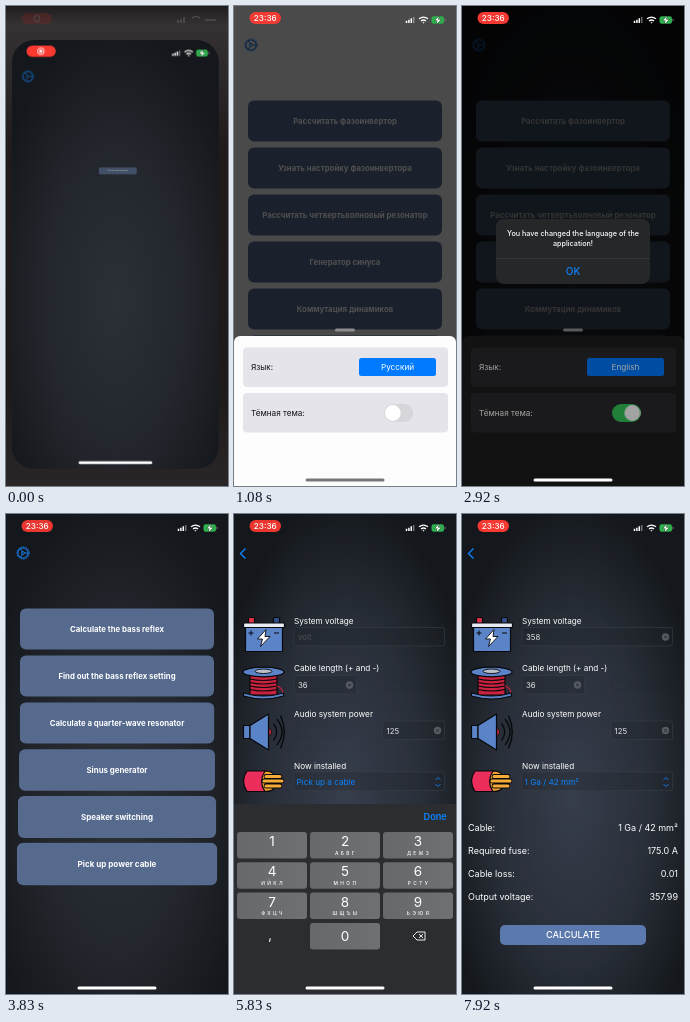
Recreate the animation shown at these times as an HTML page. Size 222 by 480 pixels, loop 8000 ms.

```html
<!DOCTYPE html>
<html lang="en">
<head>
<meta charset="utf-8">
<title>Speaker calculator</title>
<style>
  html, body { margin: 0; width: 100%; height: 100%; overflow: hidden; background: #0b0a0a; }
  svg { position: absolute; left: 0; top: 0; width: 222px; height: 480px; display: block; }
  #app { transform-origin: 0 0; }
  text { font-family: Inter, "Noto Sans", sans-serif; font-size: 8.2px; fill: #fff; white-space: pre; }
  .mid { text-anchor: middle; }
  .end { text-anchor: end; }
  .bold { font-weight: 600; }
  .blue { fill: #0a84ff; }
  .button, .pop { transform-box: fill-box; transform-origin: center; }
  .button rect { fill: #566a8e; }
  .button text { font-size: 7.8px; font-weight: 700; text-anchor: middle; }
  .box { fill: #1c2027; fill-opacity: .25; stroke: #3a3f48; stroke-width: .6; }
  .hint { fill: #4b4f58; font-size: 7.8px; }
  .value { fill: #e2e3e6; font-size: 7.8px; }
  .result text { font-size: 9px; }
  .key rect { fill: url(#keycap); }
  .key .digit { font-size: 13.5px; }
  .key .letters { font-size: 4.8px; font-weight: 500; letter-spacing: .5em; }
  .art { stroke: #08090c; stroke-width: 1.2; stroke-linejoin: round; }
</style>
</head>
<body>
<svg id="home" viewBox="0 0 222 480">
  <defs>
    <linearGradient id="wall" x2="0" y2="1">
      <stop offset="0" stop-color="#1f1d1e"/><stop offset=".04" stop-color="#353234"/>
      <stop offset=".3" stop-color="#211a1b"/><stop offset=".8" stop-color="#1f1a1a"/>
      <stop offset="1" stop-color="#2a2627"/>
    </linearGradient>
  </defs>
  <rect width="222" height="480" fill="url(#wall)"/>
  <g opacity=".3">
    <rect x="16" y="7" width="30" height="11" rx="5.5" fill="#8a2420"/>
    <circle cx="31" cy="12.5" r="3" fill="none" stroke="#999"/>
    <path d="M172 17v-3m3 3v-4m3 4v-6M186 12q4-3 8 0M199 14h11" stroke="#999" stroke-width="1.6" fill="none"/>
  </g>
</svg>

<svg id="app" viewBox="0 0 222 480">
  <defs>
    <radialGradient id="night" cx=".5" cy=".58" r=".62">
      <stop offset="0" stop-color="#2b2f36"/><stop offset=".55" stop-color="#23272d"/>
      <stop offset="1" stop-color="#14171b"/>
    </radialGradient>
    <radialGradient id="glow" cx=".5" cy=".58" r=".62">
      <stop offset="0" stop-color="#7086b8" stop-opacity=".17"/>
      <stop offset=".55" stop-color="#7086b8" stop-opacity=".09"/>
      <stop offset="1" stop-color="#7086b8" stop-opacity="0"/>
    </radialGradient>
    <linearGradient id="keycap">
      <stop offset="0" stop-color="#67686b"/><stop offset="1" stop-color="#6f7073"/>
    </linearGradient>
  </defs>
  <rect width="222" height="480" fill="url(#night)"/>
  <rect id="day" width="222" height="480" fill="#f0eff2"/>

  <g id="menu">
    <g id="gear" fill="none" stroke="#1878e0" transform="translate(17 39)">
      <circle r="5.2" stroke-width="1.2"/>
      <circle r="6.2" stroke-width="1" stroke-dasharray="1.3 1.3"/>
      <circle r="1.4"/>
      <path d="M1.4 0H5M-.7-1.2-2.5-4.3M-.7 1.2-2.5 4.3"/>
    </g>
    <g id="ru"></g>
    <g id="en"></g>
  </g>

  <g id="page">
    <rect width="222" height="480" fill="url(#glow)"/>
    <path d="M11.500 34.500 6.500 39.500 11.500 44.500" fill="none" stroke="#0a84ff" stroke-width="1.4"/>
    <g class="art">
      <rect x="14.500" y="103.500" width="6" height="6" rx="1" fill="#e0304a"/>
      <rect x="39.500" y="103.500" width="6" height="6" rx="1" fill="#32508c"/>
      <rect x="11.500" y="113" width="37" height="24.500" fill="#5a83c8"/>
      <rect x="9.500" y="109" width="41" height="4.500" rx="1" fill="#e6ebf4"/>
      <path d="M14.500 119h5m-2.500-2.500v5M40 119h5" fill="none" stroke-width="1"/>
      <path d="M32 115.500 23.500 125h5l-2 7.500 9.500-10h-5z" fill="#fff" stroke-width=".9"/>
    </g>
    <g class="art">
      <path d="M16 160h27v21H16z" fill="#c9223e"/>
      <path d="M16 165q13 3 27 0M16 168.500q13 3 27 0M16 172q13 3 27 0M16 175.500q13 3 27 0" fill="none" stroke-width="1.100"/>
      <path d="M43 172q6 2 6 8" fill="none" stroke="#c9223e"/>
      <path d="M9.500 179q20 6 40 0v3q-20 6-40 0z" fill="#5a83c8"/>
      <ellipse cx="29.500" cy="158" rx="20.500" ry="4.800" fill="#5a83c8"/>
      <ellipse cx="29.500" cy="157.300" rx="8.500" ry="2.200" fill="#b9c0cc" stroke-width=".9"/>
    </g>
    <g class="art">
      <rect x="9.500" y="211.500" width="6.500" height="13" fill="#5a83c8"/>
      <path d="M16 211.500 34.500 200v36L16 224.500z" fill="#5a83c8"/>
      <path d="M35 213.500q5 4.500 0 9z" fill="#e0304a" stroke-width=".8"/>
      <path d="M39.500 209.500q6.500 8.500 0 17M43 205q10 13 0 26M46.500 201.500q7.500 16.500 0 33" fill="none" stroke-width="1.400"/>
    </g>
    <g class="art">
      <path d="M13 257h19q-6 10 0 20.500H13q-7-10.500 0-20.500z" fill="#ec2e5c"/>
      <path d="M31 257q-7 10.500 0 20.500 8 0 9-4V261q-2-4-9-4z" fill="#f0a030"/>
      <path d="M32 262.500h14M30 267h18M32 272h14" fill="none" stroke-width="4.800" stroke-linecap="round"/>
      <path d="M32 262.500h14M30 267h18M32 272h14" fill="none" stroke="#f4ab38" stroke-width="3" stroke-linecap="round"/>
    </g>
    <g id="form"></g>
    <g id="results" class="result"></g>
    <g id="calc">
      <rect x="38" y="411" width="146" height="20" rx="5" fill="#5b79ad"/>
      <text class="mid" x="111" y="424.300" style="font-size:9.200px;font-weight:500">CALCULATE</text>
    </g>
    <g id="picker" class="pop"></g>
  </g>

  <g id="keyboard">
    <rect y="290" width="222" height="190" fill="#2c2d30"/>
    <text class="blue bold" x="189.500" y="305.500" style="font-size:9.200px">Done</text>
    <g id="keys"></g>
    <text class="mid" x="36" y="426" style="font-size:13px">,</text>
    <path d="M179 422l4-4h8v8h-8zM185 420l4 4m0-4-4 4" fill="none" stroke="#fff" stroke-width=".9"/>
  </g>

  <rect id="dim" width="222" height="480" opacity="0"/>
  <g id="sheet">
    <rect x="101" y="322.500" width="20" height="3" rx="1.500" fill="#8d8d91"/>
    <rect id="sheetBg" y="330" width="222" height="170" rx="6"/>
    <rect class="row" x="9" y="341.500" width="205" height="39.500" rx="4"/>
    <rect class="row" x="9" y="387" width="205" height="39.500" rx="4"/>
    <text class="label" x="17" y="364">Язык:</text>
    <text class="label" x="17" y="410">Тёмная тема:</text>
    <rect x="125" y="352" width="77" height="18" rx="2.500" fill="#007aff"/>
    <text id="langRu" class="mid" x="163.500" y="364">Русский</text>
    <text id="langEn" class="mid" x="163.500" y="364">English</text>
    <rect id="track" x="150" y="398" width="29" height="18" rx="9"/>
    <circle id="knob" cx="158.800" cy="407" r="7.900" fill="#fff"/>
    <g id="langMenu" class="pop">
      <rect x="110" y="304" width="96" height="44" rx="6" fill="#2b2c2f"/>
      <path d="M110 326h96" stroke="#46474b" stroke-width=".6"/>
      <text x="126" y="318">Русский</text>
      <text x="126" y="340">English</text>
      <path d="M116 315l2 2.500 4-5" fill="none" stroke="#fff"/>
    </g>
  </g>

  <rect id="alertDim" width="222" height="480" opacity="0"/>
  <g id="alert" class="pop">
    <rect x="34" y="213" width="154" height="65" rx="8" fill="#262729"/>
    <g class="mid" style="font-weight:500">
      <text x="111" y="230" style="font-size:7.200px">You have changed the language of the</text>
      <text x="111" y="239.500" style="font-size:7.200px">application!</text>
      <text class="blue" x="111" y="269" style="font-size:10px">OK</text>
    </g>
    <path d="M34 252.500h154" stroke="#404145" stroke-width=".6"/>
  </g>

  <rect id="pill" x="15.500" y="6" width="31.500" height="12" rx="6" fill="#fb3a32"/>
  <g id="rec" fill="none" stroke="#fff"><circle cx="31" cy="12" r="3.500"/><circle cx="31" cy="12" r="1.300" fill="#fff"/></g>
  <text id="clock" class="mid" x="31.200" y="15" style="font-weight:500">23:36</text>
  <g fill="none" stroke="#fff" stroke-width="1.500">
    <path d="M172.500 17v-2.200m2.400 2.200v-3.200m2.400 3.200v-4.700"/>
    <path d="M179.700 17v-6" opacity=".4"/>
    <path d="M185 12.800q4.500-3.500 9 0M187 15q2.500-2 5 0" stroke-width="1.300"/>
    <circle cx="189.500" cy="16.700" r=".4" stroke-width="1"/>
  </g>
  <rect x="197.500" y="10.300" width="12.500" height="7.400" rx="2.200" fill="#2fae4e"/>
  <path d="M211 12.800v2.400" stroke="#777" stroke-width="1"/>
  <path d="M205 10l-4 4.500h2.500l-1 3.500 4.500-4.500H204z" fill="#fff" stroke="#0d2213" stroke-width=".7" paint-order="stroke"/>
  <rect id="homeBar" x="71.500" y="472.600" width="79" height="3" rx="1.500"/>
</svg>

<script>
const LOOP = 8000;
const find = id => document.getElementById(id);
const all = target => typeof target === 'string' ? [...document.querySelectorAll(target)] : [target];

// frames: [[ms, properties], ...]; the first and last poses are held to the loop's ends
function anim(target, frames) {
  const poses = [[0, frames[0][1]], ...frames, [LOOP, frames.at(-1)[1]]]
    .map(([ms, props]) => ({ ...props, offset: ms / LOOP }));
  all(target).forEach(el => el.animate(poses, { duration: LOOP, iterations: Infinity }));
}

function fade(target, ...stops) {
  anim(target, stops.map(([ms, opacity]) => [ms, { opacity }]));
}

function show(target, from, to = LOOP, time = 0) {
  const stops = from > 0 ? [[from, 0], [from + time, 1]] : [[0, 1]];
  if (to < LOOP) stops.push([to, 1], [to + time, 0]);
  fade(target, ...stops);
}

function pop(id, from, to) {
  const small = { opacity: 0, transform: 'scale(.85)' }, full = { opacity: 1, transform: 'scale(1)' };
  anim('#' + id, [[from, small], [from + 110, full], [to, full], [to + 90, small]]);
}

function slide(id, from, to, ...times) {
  const start = { transform: from, easing: 'ease-out' }, end = { transform: to, easing: 'ease-in' };
  anim('#' + id, times.map((ms, i) => [ms, i === 1 || i === 2 ? end : start]));
}

function add(parent, markup) {
  find(parent).insertAdjacentHTML('beforeend', markup);
  return find(parent).lastElementChild;
}

// App window opening
const opening = 'cubic-bezier(.2,.7,.3,1)';
const windowed = { transform: 'translate(6px,34px) scale(.932)', clipPath: 'inset(0px 0px 20px 0px round 24px)' };
anim('#app', [[0, windowed], [60, { ...windowed, easing: opening }],
  [320, { transform: 'translate(0px,0px) scale(1)', clipPath: 'inset(0px 0px 0px 0px round 0px)' }]]);
anim('#homeBar', [[60, { transform: 'translateY(-20.5px)', easing: opening }], [320, { transform: 'translateY(0px)' }]]);
fade('#gear', [60, .6], [300, 1]);
show('#rec', 0, 580);
show('#clock', 580);
find('pill').animate({ opacity: [1, .9, 1] }, { duration: 1600, iterations: Infinity });

// Menus
function buildMenu(id, labels, start, gap) {
  labels.forEach((label, i) => {
    const top = 94.5 + 47 * i, t = start + gap * i;
    const button = add(id, `<g class="button"><rect x="14" y="${top}" width="194" height="41" rx="6"/>
      <text x="111" y="${top + 23.5}">${label}</text></g>`);
    const seed = { transform: 'translate(2.5px,25.5px) scale(.21,.19)', easing: 'ease-out' };
    anim(button, [
      [t, { ...seed, opacity: start < 100 && i === 0 ? .6 : 0 }],
      [t + 250, { transform: 'translate(0px,0px) scale(1.04,1.04)', opacity: 1, easing: 'ease-in-out' }],
      [t + 420, { transform: 'translate(0px,0px) scale(1,1)', opacity: 1 }]]);
  });
}
buildMenu('ru', ['Рассчитать фазоинвертор', 'Узнать настройку фазоинвертора',
  'Рассчитать четвертьволновый резонатор', 'Генератор синуса', 'Коммутация динамиков',
  'Подобрать силовой кабель'], 60, 60);
buildMenu('en', ['Calculate the bass reflex', 'Find out the bass reflex setting',
  'Calculate a quarter-wave resonator', 'Sinus generator', 'Speaker switching',
  'Pick up power cable'], 3380, 30);
show('#ru', 0, 3380);
show('#en', 3380);

// Settings sheet and theme
slide('sheet', 'translateY(165px)', 'translateY(0px)', 600, 850, 3130, 3350);
fade('#dim', [600, 0], [850, .69], [3130, .69], [3350, 0]);
function theme(target, prop, dark, light) {
  anim(target, [[950, dark], [1040, light], [1500, light], [1600, dark]].map(([ms, v]) => [ms, { [prop]: v }]));
}
theme('#day', 'opacity', 0, 1);
theme('#sheetBg', 'fill', '#1c1c1e', '#fdfdfe');
theme('.row', 'fill', '#29292b', '#e5e4ea');
theme('.label', 'fill', '#ffffff', '#111113');
theme('#track', 'fill', '#34c759', '#d6d5da');
theme('#knob', 'transform', 'translateX(11.5px)', 'translateX(0px)');
theme('#homeBar', 'fill', '#ffffff', '#77777b');
pop('langMenu', 1950, 2400);
show('#langRu', 0, 2440);
show('#langEn', 2440);
pop('alert', 2600, 3050);
fade('#alertDim', [2600, 0], [2710, .36], [3050, .36], [3140, 0]);

// Cable page
anim('#menu', [[4120, { transform: 'translateX(0px)', opacity: 1, easing: 'ease-out' }],
  [4400, { transform: 'translateX(-66px)', opacity: 0 }]]);
slide('page', 'translateX(222px)', 'translateX(0px)', 4120, 4400);
slide('keyboard', 'translateY(190px)', 'translateY(0px)', 4480, 4660, 6380, 6560);

const form = markup => add('form', markup);
const box = (x, y, w) => `<rect class="box" x="${x}" y="${y}" width="${w}" height="18.5" rx="2"/>`;
[['System voltage', 110], ['Cable length (+ and -)', 157], ['Audio system power', 202.5], ['Now installed', 255]]
  .forEach(([label, y]) => form(`<text x="60" y="${y}">${label}</text>`));

// An input that is typed in one key at a time, then left
function field(x, y, w, hint, word, times, blur) {
  form(box(x, y, w));
  const baseline = y + 12.8;
  show(form(`<text class="hint" x="${x + 4}" y="${baseline}">${hint}</text>`), 0, times[0]);
  const typed = (text, caret) => form(
    `<text class="value" x="${x + 4}" y="${baseline}">${text}<tspan class="blue">${caret}</tspan></text>`);
  times.forEach((t, i) => {
    show(typed(word.slice(0, i + 1), '|'), t, times[i + 1] ?? blur);
    flashKey(word[i], t);
  });
  show(typed(word, ''), blur);
  const [cx, cy] = [x + w - 7, y + 9.5];
  show(form(`<g><circle cx="${cx}" cy="${cy}" r="3.7" fill="#565a62"/>
    <path d="M${cx - 1.3} ${cy - 1.3}l2.6 2.6m0-2.6-2.6 2.6" stroke="#222" stroke-width=".8"/></g>`), times[0]);
}

// The alternative input fades once its partner is filled
function alternative(x, y, w, hint, t) {
  fade(form(`<g>${box(x, y, w)}<text class="hint" x="${x + 4}" y="${y + 12.8}">${hint}</text></g>`), [t, 1], [t + 100, .1]);
  show(form(`<text class="mid bold" x="135" y="${y + 12.3}">and</text>`), 0, t, 100);
}

// Keypad
const letters = ['', 'АБВГ', 'ДЕЖЗ', 'ИЙКЛ', 'МНОП', 'РСТУ', 'ФХЦЧ', 'ШЩЪЫ', 'ЬЭЮЯ'];
const keyAt = digit => digit === 0 ? [76, 409] : [3 + 73 * ((digit - 1) % 3), 318 + 30.2 * Math.floor((digit - 1) / 3)];
const keyRect = ([x, y], extra = '') => `<rect x="${x}" y="${y}" width="70" height="26.5" rx="3" ${extra}/>`;
for (let d = 0; d < 10; d++) {
  const [x, y] = keyAt(d);
  add('keys', `<g class="key">${keyRect([x, y])}
    <text class="mid digit" x="${x + 35}" y="${y + (d ? 14.2 : 18)}">${d}</text>
    <text class="mid letters" x="${x + 36}" y="${y + 22.5}">${letters[d - 1] ?? ''}</text></g>`);
}
function flashKey(digit, t) {
  show(add('keys', keyRect(keyAt(+digit), 'fill="#fff" fill-opacity=".2"')), t - 40, t + 50);
}

alternative(60, 207, 62, 'ampere', 4720);
field(148.5, 207, 62, 'watt', '125', [4720, 4850, 5080], 5300);
alternative(148.5, 161.5, 62, 'feet', 5450);
field(60, 161.5, 62.5, 'meters', '36', [5450, 5620], 5750);
field(60, 113.5, 150.5, 'volt', '358', [5950, 6100, 6250], 6380);

// Cable picker
form(box(60, 258, 150.5));
show(form('<text class="blue" x="62.5" y="271">Pick up a cable</text>'), 0, 7330);
show(form('<text class="blue" x="62.5" y="271">1 Ga / 42 mm²</text>'), 7330);
form('<path d="M201.500 266l2.500-2.500 2.500 2.500M201.500 270l2.500 2.500 2.500-2.500" fill="none" stroke="#0a84ff" stroke-width=".9"/>');
add('picker', '<rect x="60" y="281" width="136" height="92" rx="6" fill="#2b2c2f"/>');
['8 Ga / 8 mm²', '4 Ga / 21 mm²', '2 Ga / 34 mm²', '1 Ga / 42 mm²'].forEach((name, i) =>
  add('picker', `<text x="74" y="${295.5 + 23 * i}">${name}</text>`));
pop('picker', 6850, 7250);

// Results
[['Cable:', '1 Ga / 42 mm²'], ['Required fuse:', '175.0 A'], ['Cable loss:', '0.01'], ['Output voltage:', '357.99']]
  .forEach(([name, value], i) => {
    const y = 316.5 + 23.2 * i;
    add('results', `<text x="6" y="${y}">${name}</text>`);
    add('results', `<text class="end" x="216" y="${y}">${value}</text>`);
  });
show('#calc', 7380, LOOP, 80);
show('#results', 7620, LOOP, 120);
</script>
</body>
</html>
```
